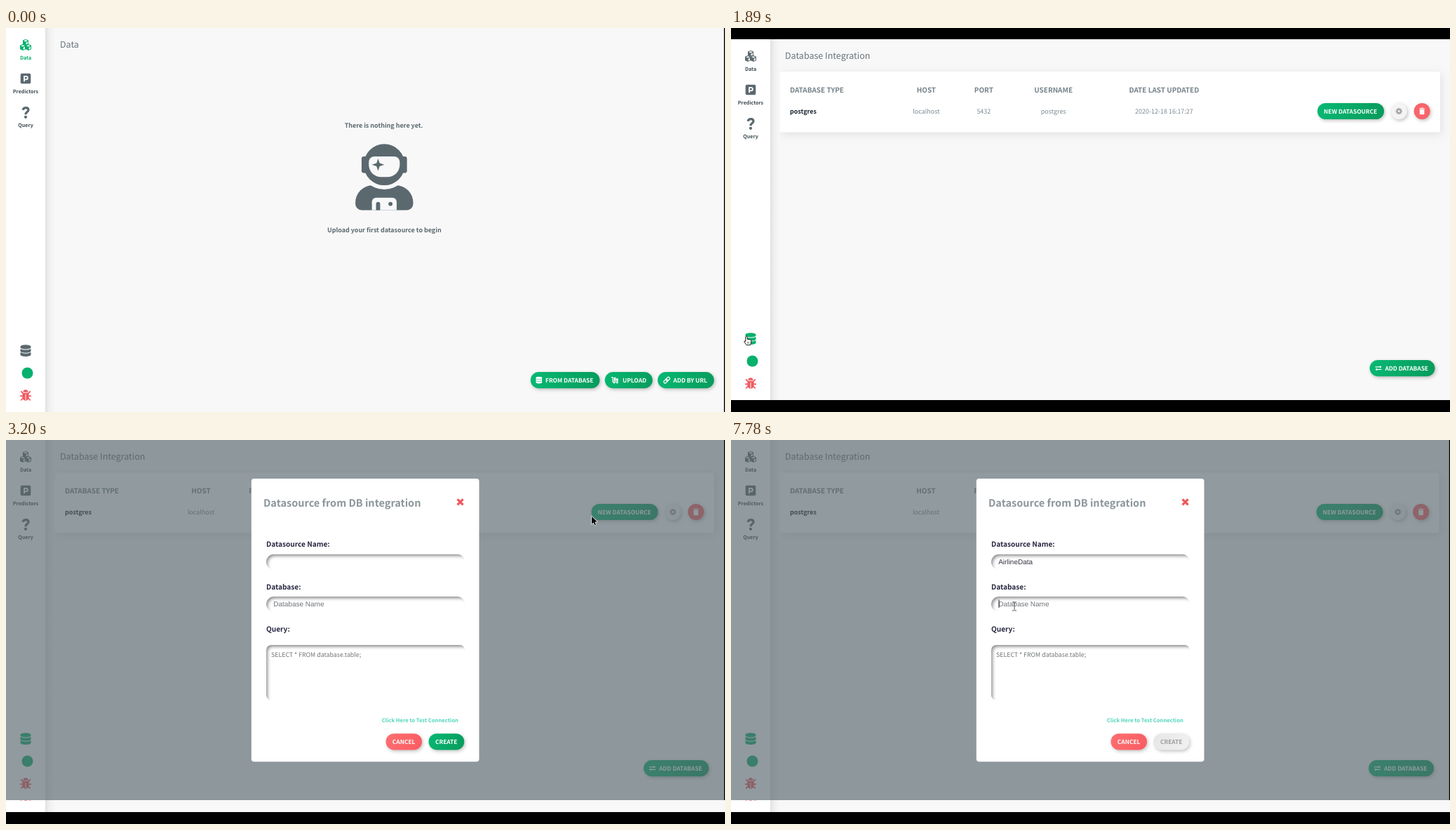
Recreate the animation shown at these times as an HTML page with a canvas. Size 1025x547 px, loop 8000 ms.

```html
<!DOCTYPE html>
<html lang="en">
<head>
<meta charset="utf-8">
<title>Database integration</title>
<style>
html, body { margin: 0; width: 100%; height: 100%; overflow: hidden; background: #000; }
canvas { display: block; width: 1025px; height: 547px; }
</style>
</head>
<body>
<canvas id="stage"></canvas>
<script>
const W = 1025, H = 547, LOOP = 8000;
const SANS = '"Noto Sans CJK JP", "Noto Sans CJK SC", "Noto Sans CJK KR", "Noto Sans CJK TC", sans-serif';
const ARIAL = '"Liberation Sans", Arial, sans-serif';
const PAGE = '#f8f8f8', SLATE = '#5b696f', GREEN = '#06b06d', RED = '#f0595f';
const GREENS = ['#07b873', '#089b5c'], REDS = ['#fd6e70', '#f95c62'], GREYS = ['#e6e6e6', '#f1f1f1'];

const canvas = document.getElementById('stage');
const dpr = window.devicePixelRatio || 1;
canvas.width = W * dpr;
canvas.height = H * dpr;
const c = canvas.getContext('2d');

// Cursor stops: time, x, y of the hot spot; each holds until the next.
const PATHS = {
  arrow: [[650, 436, 52], [690, 400, 84], [730, 330, 134], [765, 258, 188], [800, 194, 234],
    [940, 150, 285], [1000, 105, 333], [1160, 60, 392], [1180, 31, 416],
    [2070, 190, 398], [2155, 440, 318], [2240, 670, 244], [2390, 762, 200], [2530, 834, 167], [2690, 866, 140],
    [3200, 835, 109], [3300, 790, 118], [3400, 715, 131], [3500, 668, 140]],
  hand: [[1320, 24, 432], [1500, 23, 436], [1600, 22, 439], [2860, 878, 112], [2945, 880, 104], [3030, 880, 101]],
  beam: [[3600, 560, 167], [3700, 480, 172], [3810, 420, 177], [3910, 400, 179],
    [7500, 426, 183], [7600, 416, 208], [7690, 404, 237]],
  none: [[6220, 0, 0]]
};
const STOPS = Object.entries(PATHS)
  .flatMap(([kind, list]) => list.map(([t, x, y]) => ({ t, x, y, kind })))
  .sort((a, b) => a.t - b.t);

// Time at which each letter of the name is typed.
const NAME = 'AirlineData';
const KEYS = [4380, 4950, 5050, 5240, 5460, 5630, 5630, 6220, 6330, 6510, 6610];

const ramp = (t, a, b) => Math.min(1, Math.max(0, (t - a) / (b - a)));
const mix = (a, b, k) => {
  const part = (s, i) => parseInt(s.slice(i, i + 2), 16);
  return `rgb(${[1, 3, 5].map(i => Math.round(part(a, i) + (part(b, i) - part(a, i)) * k))})`;
};

function text(s, x, y, size, color, { bold = true, align = 'left', font = SANS } = {}) {
  c.font = `${bold ? 700 : 400} ${size}px ${font}`;
  c.textAlign = align;
  c.fillStyle = color;
  c.fillText(s, x, y);
}
function box(x, y, w, h, color) {
  c.fillStyle = color;
  c.fillRect(x, y, w, h);
}
function round(x, y, w, h, r, color) {
  c.beginPath();
  c.roundRect(x, y, w, h, r);
  c.fillStyle = color;
  c.fill();
}
function disc(x, y, r, color) {
  c.beginPath();
  c.arc(x, y, r, 0, 2 * Math.PI);
  c.fillStyle = color;
  c.fill();
}
function trace(pts) {
  c.beginPath();
  for (let i = 0; i < pts.length; i += 2) c.lineTo(pts[i], pts[i + 1]);
}
function poly(pts, color) {
  trace(pts);
  c.closePath();
  c.fillStyle = color;
  c.fill();
}
function line(pts, width, color) {
  trace(pts);
  c.lineWidth = width;
  c.strokeStyle = color;
  c.stroke();
}
function at(x, y, scale, draw) {
  c.save();
  c.translate(x, y);
  c.scale(scale, scale);
  draw();
  c.restore();
}
function shaded(dx, dy, blur, color, draw) {
  c.save();
  c.shadowOffsetX = dx * dpr;
  c.shadowOffsetY = dy * dpr;
  c.shadowBlur = blur * dpr;
  c.shadowColor = color;
  draw();
  c.restore();
}

// Icons are drawn around their centre.
function cubes(x, y, color) {
  for (const [dx, dy] of [[0, -3.6], [-4, 3.6], [4, 3.6]]) at(x + dx, y + dy, 1, () => {
    poly([0, -4.5, 4, -2.8, 4, 2.6, 0, 4.5, -4, 2.6, -4, -2.8], color);
    poly([0, -3.4, 2.9, -2.2, 0, -1, -2.9, -2.2], '#fff');
    poly([.6, .3, 3, -.8, 3, 1.9, .6, 3.1], '#fff');
  });
}
function parking(x, y) {
  round(x - 7.3, y - 7.3, 14.6, 14.6, 2, SLATE);
  c.lineJoin = 'round';
  c.beginPath();
  c.moveTo(x - 2, y + 4.2);
  c.lineTo(x - 2, y - 3.2);
  c.lineTo(x + .6, y - 3.2);
  c.arc(x + .6, y - .9, 2.3, -Math.PI / 2, Math.PI / 2);
  c.lineTo(x - 2, y + 1.4);
  c.lineWidth = 1.8;
  c.strokeStyle = '#fff';
  c.stroke();
}
function question(x, y) {
  c.beginPath();
  c.moveTo(x - 4, y - 3.7);
  c.bezierCurveTo(x - 2.6, y - 8.2, x + 4, y - 7.6, x + 4, y - 3.8);
  c.bezierCurveTo(x + 4, y - 1, x, y - .8, x, y + 2.7);
  c.lineWidth = 3.2;
  c.strokeStyle = SLATE;
  c.stroke();
  disc(x, y + 6.3, 2.1, SLATE);
}
function database(x, y, color, scale = 1) {
  at(x, y, scale, () => {
    c.fillStyle = color;
    c.beginPath();
    c.ellipse(0, -5.8, 7.5, 2.5, 0, Math.PI, 0);
    c.ellipse(0, -4.5, 7.5, 2.5, 0, 0, Math.PI);
    c.fill();
    for (const top of [-2.6, 2.6]) {
      c.beginPath();
      c.moveTo(-7.5, top);
      c.quadraticCurveTo(0, top + 3.4, 7.5, top);
      c.lineTo(7.5, top + 3.4);
      c.ellipse(0, top + 3.4, 7.5, 2.4, 0, 0, Math.PI);
      c.fill();
    }
  });
}
function bug(x, y) {
  at(x, y, 1, () => {
    c.beginPath();
    c.arc(0, -4.5, 3.6, Math.PI, 0);
    c.fillStyle = RED;
    c.fill();
    round(-4.5, -3.6, 9, 11.2, [0, 0, 4.5, 4.5], RED);
    box(-.5, -1.5, 1, 9, '#fff');
    for (const s of [-1, 1]) {
      line([s * 6.8, -6, s * 4, -3], 1.7, RED);
      line([s * 4, 1, s * 8, 1], 1.8, RED);
      line([s * 4, 4, s * 6.8, 7.2], 1.7, RED);
    }
  });
}
function gear(x, y, color) {
  at(x, y, 1, () => {
    for (let i = 0; i < 4; i++) {
      box(-1, -4.6, 2, 9.2, color);
      c.rotate(Math.PI / 4);
    }
    disc(0, 0, 3.5, color);
    disc(0, 0, 1.5, '#f4f4f4');
  });
}
function trash(x, y) {
  box(x - 3.8, y - 4.3, 7.6, 1.2, '#fff');
  box(x - 1.4, y - 5, 2.8, 1, '#fff');
  round(x - 3.3, y - 2.5, 6.6, 7.3, [0, 0, 1, 1], '#fff');
}
function trolley(x, y) {
  line([x - 5, y - 4, x - 3, y - 4, x - 3, y + 2.5, x + 5, y + 2.5], 1.2, '#fff');
  box(x - 1.5, y - 4, 2.8, 5.2, '#fff');
  box(x + 1.9, y - 2.4, 2.8, 3.6, '#fff');
  disc(x - 1, y + 3.9, 1.1, '#fff');
  disc(x + 3.3, y + 3.9, 1.1, '#fff');
}
function chain(x, y) {
  at(x, y, 1, () => {
    c.rotate(-Math.PI / 4);
    c.lineWidth = 1.3;
    c.strokeStyle = '#fff';
    for (const left of [-5.3, -.9]) {
      c.beginPath();
      c.roundRect(left, -1.9, 6.2, 3.8, 1.9);
      c.stroke();
    }
  });
}
function swap(x, y) {
  for (const s of [-1, 1]) {
    line([x + s * 4.5, y + s * 1.8, x - s * 3, y + s * 1.8], 1.2, '#fff');
    poly([x - s * 4.7, y + s * 1.8, x - s * 2, y, x - s * 2, y + s * 3.6], '#fff');
  }
}
function astronaut(x, y) {
  at(x, y, .1838, () => {
    round(0, 320, 448, 192, [134, 134, 48, 48], SLATE);
    disc(224, 160, 192, PAGE);
    disc(224, 160, 160, SLATE);
    round(48, 96, 352, 128, 16, SLATE);
    round(104, 96, 240, 160, [44, 44, 96, 96], PAGE);
    const star = [];
    for (let i = 0; i < 8; i++) {
      const r = i % 2 ? 17 : 48, a = i * Math.PI / 4;
      star.push(176 + r * Math.cos(a), 160 + r * Math.sin(a));
    }
    poly(star, SLATE);
    round(128, 416, 192, 97, [32, 32, 0, 0], PAGE);
    round(160, 448, 32, 64, [16, 16, 0, 0], SLATE);
    disc(272, 464, 16, SLATE);
  });
}

function pill(label, x, y, w, textX, colors = GREENS, ink = '#fff') {
  const g = c.createLinearGradient(x, y - 11, x + w, y + 11);
  colors.forEach((color, i) => g.addColorStop(i, color));
  shaded(1.5, 2, 5, 'rgba(0,0,0,.24)', () => round(x, y - 11.6, w, 23.2, 11.6, g));
  text(label, textX, y + 3.2, 8.4, ink);
}
function knob(x, y, color) {
  shaded(1.5, 2, 5, 'rgba(0,0,0,.24)', () => disc(x, y, 11.5, color));
}

function sidebar(t, top, bottom) {
  const g = c.createLinearGradient(55, 0, 70, 0);
  g.addColorStop(0, '#dfdfdf');
  g.addColorStop(.45, '#f0f0f0');
  g.addColorStop(1, PAGE);
  box(55, top, 15, bottom - top, g);
  box(0, top, 56, bottom - top, '#fff');
  const onData = t < 1890;
  cubes(28, top + 24, onData ? GREEN : SLATE);
  parking(28, top + 72);
  question(28, top + 120.5);
  ['Data', 'Predictors', 'Query'].forEach((s, i) =>
    text(s, 28, top + 44.6 + i * 48.4, 7.15, i || !onData ? '#3f4d54' : GREEN, { align: 'center' }));
  database(28, bottom - 87.5, mix(SLATE, GREEN, ramp(t, 1320, 1690)));
  disc(30.5, bottom - 55.5, 8, GREEN);
  bug(28, bottom - 23.7);
}

function emptyPage(top, bottom, dx) {
  const x = 539.3 + dx * .67, y = top && 11;
  text('Data', 77, top + 28.2, 12.5, '#66747b', { bold: false });
  text('There is nothing here yet.', x - .8, y + 141.7, 8.95, SLATE, { align: 'center' });
  astronaut(x - 41.2, y + 165.3);
  text('Upload your first datasource to begin', x, y + 291, 8.95, SLATE, { align: 'center' });
  const by = bottom - 45.4;
  pill('FROM DATABASE', 747.8 + dx, by, 98.6, 769 + dx);
  pill('UPLOAD', 853.7 + dx, by, 68, 879 + dx);
  pill('ADD BY URL', 929 + dx, by, 80.4, 951.3 + dx);
  database(759.8 + dx, by, '#fff', .58);
  trolley(868 + dx, by);
  chain(942 + dx, by);
}

function tablePage(top, bottom, dx, hover) {
  text('Database Integration', 77, top + 28.2, 12.5, '#66747b', { bold: false });
  shaded(2, 3, 12, 'rgba(0,0,0,.09)', () => round(70, top + 46.3, 939.5 + dx, 86.2, 3, '#fff'));
  if (hover) box(70, top + 87, 939.5 + dx, 31, '#e8e8e8');
  text('DATABASE TYPE', 84, top + 76.2, 9.95, '#74828a');
  text('postgres', 84, top + 106.2, 8.95, '#1b2530');
  const cols = [['HOST', 'localhost', 278], ['PORT', '5432', 359.8], ['USERNAME', 'postgres', 459],
    ['DATE LAST UPDATED', '2020-12-18 16:17:27', 616.5]];
  for (const [head, cell, x] of cols) {
    const cx = x + dx * x / W;
    text(head, cx, top + 76.2, 9.95, '#74828a', { align: 'center' });
    text(cell, cx, top + 106.2, 8.95, '#7c8a92', { bold: false, align: 'center' });
  }
  const y = top + 102.5;
  pill('NEW DATASOURCE', 834.5 + dx, y, 95, 843.6 + dx);
  knob(950.7 + dx, y, '#f4f4f4');
  gear(950.7 + dx, y, '#a5a5a5');
  knob(983.6 + dx, y, '#f8646a');
  trash(983.6 + dx, y);
  const by = bottom - 45.4;
  pill('ADD DATABASE', 909 + dx, by, 93, 931 + dx);
  swap(921.5 + dx, by);
}

function field(x, y, w, h, r) {
  c.save();
  c.beginPath();
  c.roundRect(x, y, w, h, r);
  c.clip();
  shaded(1.5, 2, 5, 'rgba(0,0,0,.5)', () => {
    c.beginPath();
    c.rect(x - 20, y - 20, w + 40, h + 40);
    c.roundRect(x, y, w + 4, h + 4, r);
    c.fillStyle = '#fff';
    c.fill('evenodd');
  });
  c.restore();
}

function modal(t) {
  box(0, 0, 1024, 513, 'rgba(86,100,106,.65)');
  round(349.8, 55, 324.7, 403.3, 4, '#fff');
  text('Datasource from DB integration', 367, 95.3, 14.5, '#8b969c');
  line([643.6, 84.4, 651.6, 92.4], 3.2, RED);
  line([651.6, 84.4, 643.6, 92.4], 3.2, RED);
  ['Datasource Name:', 'Database:', 'Query:'].forEach((s, i) => text(s, 371, 152.3 + i * 60.4, 10.1, '#272741'));
  field(371, 162.8, 283, 21.5, 10.7);
  field(371, 223, 283, 21.5, 10.7);
  field(371, 292, 283, 78.5, 7);

  const plain = { bold: false, font: ARIAL };
  const typed = NAME.slice(0, KEYS.filter(k => k <= t).length);
  text(typed, 381.2, 176.6, 10, '#34343f', plain);
  if (t >= 4280 && t < 7220) box(381.4 + c.measureText(typed).width, 167.5, 1, 11.5, '#222');
  text('Database Name', 381.2, 237, 10, '#70757a', plain);
  if (t >= 7780) box(381.5, 227.5, 1, 11.5, '#222');
  text('SELECT * FROM database.table;', 378, 308.6, 8.8, '#6e7275', { bold: false });
  text('Click Here to Test Connection', 535.8, 401.8, 7.6, '#50d6ba');

  const off = ramp(t, 4380, 4680);
  const fade = GREENS.map((g, i) => mix(g, GREYS[i], off));
  pill('CANCEL', 541.5, 429.8, 51.5, 550.8, REDS);
  pill('CREATE', 602.5, 429.8, 50.8, 612, fade, mix('#ffffff', '#9c9c9c', off));
}

const CURSORS = {
  arrow() {
    const shape = [0, 0, 0, 10.8, 2.5, 8.5, 4.2, 12.2, 6, 11.4, 4.4, 7.8, 7.8, 7.6];
    c.lineJoin = 'round';
    trace(shape);
    c.closePath();
    c.lineWidth = 1.4;
    c.strokeStyle = '#fff';
    c.stroke();
    poly(shape, '#000');
  },
  hand() {
    c.beginPath();
    c.moveTo(-1.2, 7.6);
    c.lineTo(-1.2, .6);
    c.quadraticCurveTo(0, -1, 1.2, .6);
    c.lineTo(1.2, 4.2);
    c.lineTo(5.8, 5);
    c.quadraticCurveTo(7, 5.4, 6.9, 7);
    c.lineTo(5.7, 12.6);
    c.lineTo(0, 12.6);
    c.lineTo(-3.2, 8);
    c.quadraticCurveTo(-3.4, 5.8, -1.2, 7.6);
    c.closePath();
    c.fillStyle = '#fff';
    c.fill();
    c.lineWidth = 1;
    c.strokeStyle = '#222';
    c.stroke();
    for (const x of [1.6, 3.4]) line([x, 8, x, 10.8], .7, '#444');
  },
  beam() {
    box(-.5, -6, 1, 12, '#555');
    for (const y of [-6.5, 5.5]) {
      box(-3, y, 2.4, 1, '#555');
      box(.6, y, 2.4, 1, '#555');
    }
  },
  none() {}
};

function page(t, top, bottom, dx) {
  box(0, top, W, bottom - top, PAGE);
  if (t < 1890) emptyPage(top, bottom, dx);
  else tablePage(top, bottom, dx, t >= 2860 && t < 3200);
  sidebar(t, top, bottom);
}

function render(t) {
  c.setTransform(dpr, 0, 0, dpr, 0, 0);
  c.textRendering = 'geometricPrecision';
  box(0, 0, W, H, '#000');
  if (t < 650) {
    page(t, 0, H, 0);
    box(1023.6, 0, 2, H, '#000');
  } else if (t < 2860) {
    page(t, 16, 530, 1.5);
    box(0, 0, W, 15.5, '#000');
  } else {
    // The lower strip keeps what was there before the page moved up.
    page(t, 16, 530, 1.5);
    c.save();
    c.beginPath();
    c.rect(0, 0, W, 513);
    c.clip();
    page(t, 0, 513, 0);
    box(1023.6, 0, 2, 513, '#000');
    c.restore();
    if (t >= 3200) modal(t);
  }
  const stop = STOPS.filter(s => s.t <= t).pop();
  if (stop) at(stop.x, stop.y, 1, CURSORS[stop.kind]);
}

const start = performance.now();
function tick() {
  render((performance.now() - start) % LOOP);
  requestAnimationFrame(tick);
}
tick();
</script>
</body>
</html>
```
